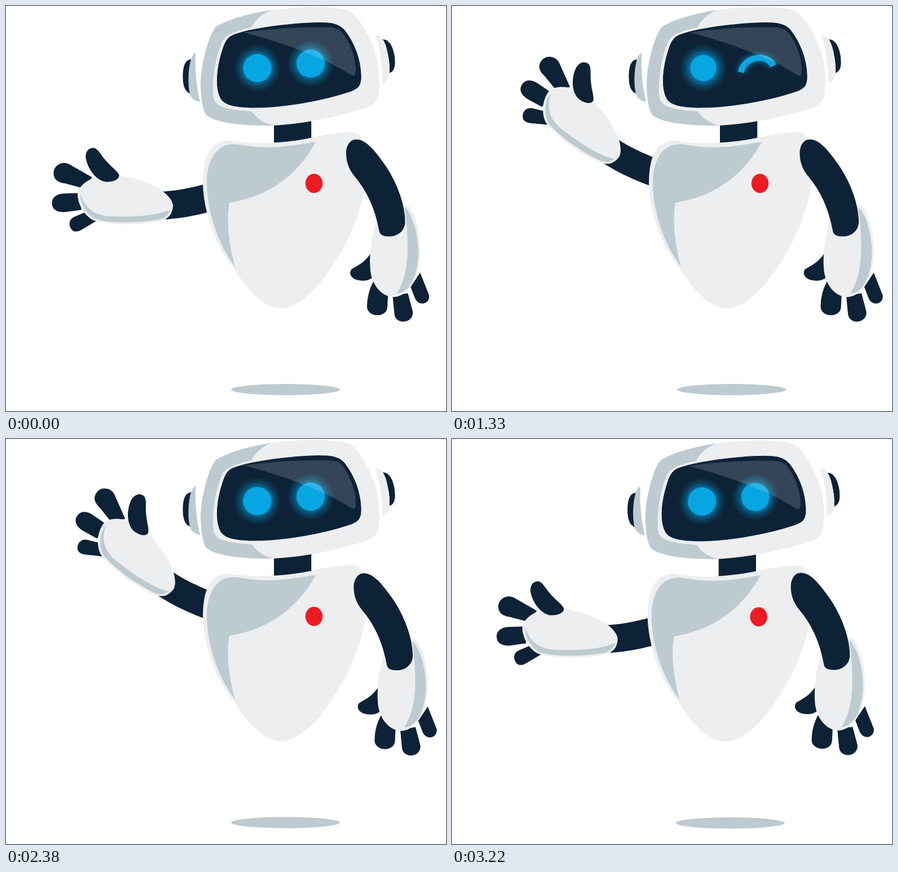
These frames come from a looping animation (780 by 718 pixels, 3.5 s). An HTML page:

```html
<!DOCTYPE html>
<html lang="en">
<head>
<meta charset="utf-8">
<title>Waving robot</title>
<style>
  html, body { margin: 0; width: 100%; height: 100%; overflow: hidden; background: #fff; }
  svg { display: block; width: 780px; height: 718px; }

  .navy { fill: #0d2236; stroke: #0d2236; stroke-width: 1.2px; }
  .light { fill: #eceef0; }
  .grey { fill: #bdcbd0; }
  .cyan { fill: #07a6e2; }

  /* One drawing step is 70 ms, which is 2% of the loop. */
  #robot, #arm, #swing, #other, #left-eye, #right-eye, #wink {
    animation: 3.5s steps(1) infinite;
  }
  #robot { animation-name: settle; }
  #arm { animation-name: reach; }
  #swing { animation-name: wave; transform-origin: 411.5px 345.5px; }
  #other { animation-name: sway; }
  #left-eye { animation-name: narrow; transform-origin: 445.5px 110px; }
  #right-eye { animation-name: blink; transform-origin: 540px 102px; }
  #wink { animation-name: wink; opacity: 0; }

  @keyframes settle {
    0% { translate: 0 0; }
    92%, 100% { translate: -2.3px .8px; }
  }
  @keyframes reach {
    0%, 14% { translate: 0 0; }
    20%, 82% { translate: -17.5px -16.2px; }
    92%, 100% { translate: 0 0; }
    14% { animation-timing-function: steps(3); }
    82% { animation-timing-function: steps(5); }
  }
  @keyframes wave {
    0%, 14% { rotate: 0deg; }
    20% { rotate: 11.2deg; }
    30% { rotate: 36.6deg; }
    32% { rotate: 38.2deg; }
    34% { rotate: 36deg; }
    40% { rotate: 21.6deg; }
    42% { rotate: 23deg; }
    46% { rotate: 32.4deg; }
    50% { rotate: 38deg; }
    52% { rotate: 35deg; }
    58% { rotate: 13deg; }
    60% { rotate: 11.4deg; }
    62% { rotate: 15deg; }
    68% { rotate: 36.6deg; }
    70% { rotate: 38.2deg; }
    72% { rotate: 36deg; }
    78% { rotate: 11.6deg; }
    82% { rotate: 11.2deg; }
    92%, 100% { rotate: 0deg; }
    42%, 46%, 78% { animation-timing-function: steps(2); }
    14%, 34%, 52%, 62%, 72% { animation-timing-function: steps(3); }
    20%, 82% { animation-timing-function: steps(5); }
  }
  @keyframes sway {
    0%, 14% { translate: 0 0; }
    20% { translate: 11.5px 5px; }
    30% { translate: 13.5px 0; }
    40%, 70% { translate: 13.5px 1.5px; }
    78%, 82% { translate: 11.5px 5px; }
    92%, 100% { translate: 0 0; }
    14% { animation-timing-function: steps(3); }
    70% { animation-timing-function: steps(4); }
    20%, 30%, 82% { animation-timing-function: steps(5); }
  }
  @keyframes narrow {
    0%, 26% { scale: 1; }
    28% { scale: .92; }
    46%, 100% { scale: 1; }
  }
  @keyframes blink {
    0% { scale: 1; opacity: 1; filter: none; }
    26% { scale: 1.14 .95; opacity: .95; filter: blur(4px); }
    28% { scale: 1.14 .95; opacity: 0; filter: none; }
    46% { scale: 1.14 .95; opacity: .95; filter: blur(4px); }
    48%, 100% { scale: 1; opacity: 1; filter: none; }
  }
  @keyframes wink {
    0% { opacity: 0; }
    28% { opacity: 1; }
    46%, 100% { opacity: 0; }
  }
</style>
</head>
<body>
<svg viewBox="0 0 780 718">
  <defs>
    <radialGradient id="glow">
      <stop offset=".5" stop-color="#07a6e2" stop-opacity=".7"/>
      <stop offset=".75" stop-color="#07a6e2" stop-opacity=".27"/>
      <stop offset="1" stop-color="#07a6e2" stop-opacity="0"/>
    </radialGradient>
    <filter id="soft" x="-50%" y="-50%" width="200%" height="200%">
      <feGaussianBlur stdDeviation="5"/>
    </filter>
    <path id="smile" d="M512 117.500C519 89 557 83 570 106" fill="none" stroke="#0fa5e1"/>
  </defs>

  <g id="robot">
    <ellipse class="grey" cx="495.500" cy="680" rx="96.500" ry="10"/>

    <!-- waving arm -->
    <g id="arm"><g id="swing">
      <g class="navy">
        <path d="M152 304L111 280.500C98 275 84 284 85 298C86 309 95 313 105 314L135 322Z"/>
        <path d="M131 332L102 333C88 334 82 341 82 349C82 360 90 365 103 365L133 361Z"/>
        <path d="M141 366L122 374C112 378 111 388 116 395C120 401 128 400 134 396L161 380Z"/>
      </g>
      <path d="M270 354Q330 353 410 323" fill="none" stroke="#0d2236" stroke-width="49.500"/>
      <path class="light" d="M127 331C132 312 160 299 185 299C235 302 290 325 296 352C296 372 285 380 265 383C230 389 180 388 155 380C138 371 126 350 127 331Z"/>
      <path class="grey" d="M132 332C138 355 155 372 185 373C220 374 265 373 291 361C288 374 278 378 262 380C225 385 185 385 160 378C143 371 131 350 132 332Z"/>
      <path class="navy" d="M155 252C163 253 168 266 177 275C188 288 198 293 200 300C200 308 188 312 176 311C160 308 146 290 142 270C141 258 147 252 155 252Z"/>
    </g></g>

    <rect class="navy" x="475.600" y="200" width="65" height="46"/>

    <!-- body -->
    <path class="light" d="M395 238C430 247 505 243 548 232C580 226 600 222 618 224C632 226 640 250 640 285C638 350 610 420 565 480C540 515 510 536 487 536C455 535 425 500 404 465C370 425 349 360 349 312C350 265 362 240 395 238Z"/>
    <path class="grey" d="M549 241C520 245 470 257 415 246C375 239 356 270 356 315C357 370 378 425 406 462C393 415 391 375 396 349C450 340 510 313 549 241Z"/>
    <ellipse cx="546" cy="314.500" rx="15.200" ry="17" fill="#ed1b24"/>

    <!-- hanging arm -->
    <g id="other">
      <g class="navy">
        <path d="M648 437C636 456 624 460 613 467C608 474 612 482 622 485C634 488 642 486 648 482Z"/>
        <path d="M652 488C643 505 640.500 520 640.500 533C641 552 675.500 553 675.500 533L676.500 512Z"/>
        <path d="M686 514L689 545C690 565 722 563 720.500 542L712 510Z"/>
        <path d="M718 498L726 519C734 533 751 527 749.500 513L734 474Z"/>
      </g>
      <path class="light" d="M658 378C648 405 643 440 646 470C650 498 668 516 688 516C715 514 733 480 734 440C735 400 725 362 708 350L690 370Z"/>
      <path class="grey" d="M707 356C724 375 731 410 731 440C729 480 715 508 693 510C710 480 715 450 710 385Z"/>
      <path class="navy" d="M621 237C638 237 653 256 673.500 285C695 318 707 355 707 384C706 400 692 408 680 408C668 408 663 405 662 398C655 360 642 329 618 301C607 288 603.500 275 603.500 260C604 246 611 237 621 237Z"/>
    </g>

    <!-- ears -->
    <path class="navy" d="M328 95Q314 96 314 125Q314 152 328 155Z"/>
    <path class="grey" d="M336 83C322 88 320 150 329 162Q335 169 344 170Q334 130 336 83Z"/>
    <path class="navy" d="M667 60C682 58 689 82 689 100Q689 115 680 118Q683 90 667 60Z"/>
    <path class="light" d="M655 51Q670 52 676 80Q682 110 679 125Q675 135 667 137Q668 90 655 51Z"/>

    <!-- head -->
    <path class="grey" d="M470 7C430 13 390 25 372 37C360 50 346 100 345 135C345 165 349 185 355 193C370 207 420 213 475 212L500 100Z"/>
    <path class="light" d="M470 7Q445 18 435 38C400 46 388 52 382 66C370 95 366 130 367 155C368 178 380 182 436 187Q450 207 475 212C540 208 600 193 640 180C655 174 661 165 661 150C663 125 661 100 653 78C640 45 627 22 612 11C600 0 530 -1 470 7Z"/>
    <path class="navy" d="M402 52C440 37 530 28 570 30C585 31 594 36 600 43C618 66 628 95 629 122C630 142 624 147 605 153C560 168 490 180 440 180C400 179 387 174 381 164C372 148 373 120 380 92C386 70 390 57 402 52Z"/>

    <circle cx="445.500" cy="110" r="42" fill="url(#glow)"/>
    <circle id="left-eye" class="cyan" cx="445.500" cy="110" r="25"/>
    <g id="right-eye">
      <circle cx="540" cy="102" r="42" fill="url(#glow)"/>
      <circle class="cyan" cx="540" cy="102" r="25"/>
    </g>
    <g id="wink">
      <use href="#smile" stroke-width="16" opacity=".5" filter="url(#soft)"/>
      <use href="#smile" stroke-width="11"/>
    </g>
    <path d="M421 47C470 40 530 36 575 38Q590 39 597 48C612 68 621 95 620 118Q619 127 611 122C570 94 490 64 421 47Z" fill="#fff" opacity=".16"/>
  </g>
</svg>
</body>
</html>
```
